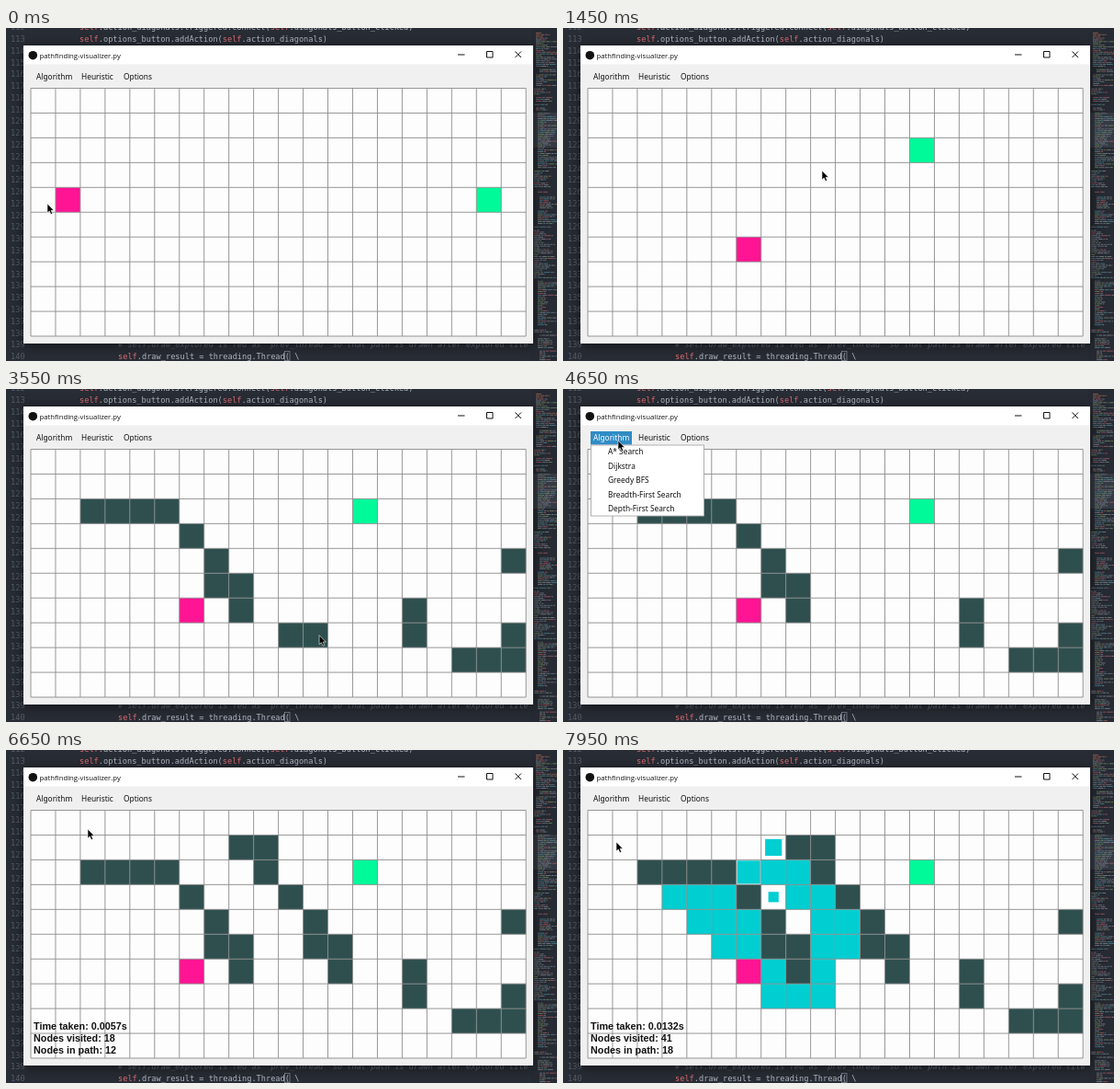
An HTML page that plays this animation: 600 px wide and 362 px high, repeating every 8000 ms.

```html
<!DOCTYPE html>
<html lang="en">
<head>
<meta charset="utf-8">
<title>Pathfinding visualizer</title>
<style>
html, body { margin: 0; width: 100%; height: 100%; overflow: hidden; background: #282c34; }
svg { display: block; width: 100vw; height: 100vh; }
text { white-space: pre; }
.code { font: 8.63px "DejaVu Sans Mono", monospace; fill: #b4bac6; }
.num { fill: #565c68; }
.self { fill: #e06c75; }
.note { fill: #5c6370; font-style: italic; }
.title { font: 7.75px "Open Sans", sans-serif; fill: #111; }
.menu { font: 8.35px "Noto Sans", sans-serif; fill: #111; }
.stats { font: bold 10.8px "Liberation Sans", Arial, sans-serif; fill: #111; }
.win { filter: drop-shadow(0 2px 7px rgba(0, 0, 0, .55)); }
</style>
</head>
<body>
<svg id="stage" viewBox="0 0 600 362"></svg>
<script>
const LOOP = 8000, COLS = 20, ROWS = 10;
const X0 = 27, Y0 = 65.5, CW = 26.96, CH = 26.95;
const STEP = 23, GROW = 89;
const PINK = '#ff1493', GREEN = '#00fa9a', WALL = '#2f4f4f', CYAN = '#00ced1', YELLOW = '#ffff00';

const stage = document.getElementById('stage');

function add(parent, tag, attrs, text) {
  const el = document.createElementNS('http://www.w3.org/2000/svg', tag);
  for (const k in attrs) el.setAttribute(k, attrs[k]);
  if (text !== undefined) el.textContent = text;
  parent.appendChild(el);
  return el;
}
const rect = (p, x, y, width, height, fill, more) =>
  add(p, 'rect', { x, y, width, height, fill, ...more });
const label = (p, x, y, cls, text) => add(p, 'text', { x, y, class: cls }, text);
const show = (el, on) => el.setAttribute('visibility', on ? 'visible' : 'hidden');

// "c,r c,r ..." to cell list
const cells = s => s.split(' ').map(p => p.split(',').map(Number));
const key = ([c, r]) => r * COLS + c;
const centre = ([c, r]) => [X0 + (c + .5) * CW, Y0 + (r + .5) * CH];

// Mouse strokes, evenly timed from start to end
const strokes = [
  { start: 1760, end: 2385, on: true, cells: cells('2,2 3,2 4,2 5,2 6,3 7,4 7,5 8,5 8,6 10,7 11,7 12,7 13,6 14,6 15,6 15,7 16,7 17,8 18,8 19,8 19,7 19,4') },
  { start: 2800, end: 3800, on: false, cells: cells('16,7 14,6 13,6 12,7 11,7 10,7') },
  { start: 5980, end: 6270, on: true, cells: cells('8,1 9,1 9,2 10,3 11,4 11,5 12,5 12,6') }
];
const path = cells('7,6 7,7 8,7 9,7 9,6 9,5 9,4 9,3 9,2 10,2 11,2 12,2');
const searches = [
  { start: 4767, end: 5980, visited: cells('6,5 6,4 5,4 5,3 5,5').concat(path), path,
    stats: ['0.0057s', 18, 12] },
  { start: 7385, end: LOOP, path: [], stats: ['0.0132s', 41, 18],
    visited: cells('6,5 6,4 5,4 5,3 4,3 7,6 5,5 4,4 3,3 7,7 8,7 9,7 9,6 9,5 9,4 10,4 10,5 9,3 8,3 8,2 7,2 6,2 7,1 7,3') }
];
const menus = [[4500, 4762], [6930, 7380]];

const wallEvents = [];
const track = [
  [0, 45, 191], [150, 66, 187], [260, 80, 190], [680, 202, 240], [850, 245, 216],
  [1030, 525, 186], [1080, 525, 186], [1320, 391, 133], [1450, 282, 155], [1690, 115, 134],
  [2400, 555, 175], [2520, 553, 178], [4000, 290, 262], [4440, 60, 56], [4650, 60, 56],
  [4730, 60, 64], [5000, 61, 61], [5700, 61, 61], [6330, 364, 241], [6650, 89, 86],
  [6860, 58, 55], [6970, 58, 56], [7270, 58, 97], [7500, 58, 100], [LOOP, 58, 100]
];
for (const s of strokes) {
  s.cells.forEach((cell, i) => {
    const t = s.start + (s.end - s.start) * i / (s.cells.length - 1);
    wallEvents.push({ t, id: key(cell), on: s.on });
    track.push([t, ...centre(cell)]);
  });
}
track.sort((a, b) => a[0] - b[0]);

function mouseAt(t) {
  let i = 1;
  while (i < track.length - 1 && track[i][0] < t) i++;
  const [t0, x0, y0] = track[i - 1], [t1, x1, y1] = track[i];
  const u = Math.min(1, Math.max(0, (t - t0) / (t1 - t0)));
  const e = t1 - t0 > 120 ? u * u * (3 - 2 * u) : u;
  return [x0 + (x1 - x0) * e, y0 + (y1 - y0) * e];
}
const cellUnder = ([x, y]) => [Math.floor((x - X0) / CW), Math.floor((y - Y0) / CH)];
function dragged(t, from, grab, drop) {
  return t < grab ? from : cellUnder(mouseAt(Math.min(t, drop)));
}

// Editor behind the window
function drawEditor() {
  rect(stage, 0, 0, 600, 362, '#282c34');
  const lineY = n => 15 + 12.78 * (n - 113);
  for (let n = 112; n <= 140; n++) label(stage, 5, lineY(n), 'code num', n);
  const code = (n, x, rich) => {
    const el = add(stage, 'text', { x, y: lineY(n), class: 'code' });
    rich.split(/(\bself\b)/).forEach(part =>
      add(el, 'tspan', part === 'self' ? { class: 'self' } : {}, part));
  };
  code(112, 80, 'self.action_diagonals.triggered.connect(self.diagonals_button_clicked)');
  code(113, 80, 'self.options_button.addAction(self.action_diagonals)');
  label(stage, 122, lineY(139), 'code note',
    "# self.draw_explored is fed as 'prev_thread' so that path is drawn after explored tile");
  code(140, 122, 'self.draw_result = threading.Thread( \\');
  rect(stage, 303.5, 351.5, 5.5, 10, 'none', { stroke: '#8b93a3', 'stroke-width': .7 });
}

function drawMinimap() {
  let seed = 11;
  const rnd = () => (seed = seed * 16807 % 2147483647) / 2147483647;
  rect(stage, 572, 0, 28, 362, '#262a32');
  rect(stage, 573, 92, 27, 38, '#343943');
  const tints = ['#8d939f', '#8d939f', '#777d89', '#b5606a', '#4f8f9b', '#7d9a68'];
  let indent = 0;
  for (let y = 3; y < 361; y += 1.9) {
    if (rnd() < .14) { indent = Math.floor(rnd() * 4) * 2; continue; }
    let x = 575 + indent;
    const end = Math.min(600, x + 5 + rnd() * 20);
    while (x < end) {
      const w = Math.min(1.5 + rnd() * 6, end - x);
      const tint = y < 10 ? '#b5705c' : tints[Math.floor(rnd() * tints.length)];
      rect(stage, x, y, w, .9, tint, { opacity: .75 });
      x += w + .8;
    }
  }
}

drawEditor();
drawMinimap();

// Window frame
const win = add(stage, 'g', { class: 'win' });
rect(win, 19, 19, 555, 324, '#f0f0f0');
rect(win, 19, 19, 555, 20.5, '#fff');
add(win, 'circle', { cx: 29.3, cy: 29.7, r: 4.8, fill: '#111' });
label(win, 36.5, 32.6, 'title', 'pathfinding-visualizer.py');
add(win, 'path', { d: 'M492 29h7.5M523.5 25.5h6.5v6.5h-6.5zM554.5 25.5l6.5 6.5m0-6.5l-6.5 6.5',
  fill: 'none', stroke: '#111', 'stroke-width': 1 });
const button = rect(win, 30, 46, 45, 14.5, '#308cc6');
const heading = label(win, 33, 56.3, 'menu', 'Algorithm');
label(win, 82, 56.3, 'menu', 'Heuristic');
label(win, 128, 56.3, 'menu', 'Options');

// Board
rect(stage, X0, Y0, COLS * CW, ROWS * CH, '#fefdfe');
const board = add(stage, 'g', {});
const tiles = [];
for (let r = 0; r < ROWS; r++) {
  for (let c = 0; c < COLS; c++) {
    tiles.push({
      x: X0 + c * CW, y: Y0 + r * CH,
      base: rect(board, X0 + c * CW, Y0 + r * CH, CW, CH, 'none'),
      top: rect(board, 0, 0, 0, 0, 'none')
    });
  }
}
let lines = '';
for (let c = 0; c <= COLS; c++) lines += `M${X0 + c * CW} ${Y0}v${ROWS * CH}`;
for (let r = 0; r <= ROWS; r++) lines += `M${X0} ${Y0 + r * CH}h${COLS * CW}`;
add(stage, 'path', { d: lines, fill: 'none', stroke: '#8c8c8c', 'stroke-width': .9 });

const stats = [304, 317, 330].map(y => label(stage, 30, y, 'stats', ''));

// Drop-down
const drop = add(stage, 'g', {});
rect(drop, 30.5, 61, 123, 77, '#fff', { stroke: '#a9a9a9', 'stroke-width': .9 });
const items = ['A* Search', 'Dijkstra', 'Greedy BFS', 'Breadth-First Search', 'Depth-First Search']
  .map((name, i) => ({
    top: 61.2 + 15.4 * i,
    bar: rect(drop, 31, 61.2 + 15.4 * i, 122, 15.2, '#308cc6'),
    text: label(drop, 49, 71.3 + 15.45 * i, 'menu', name)
  }));

const cursor = add(stage, 'path', {
  d: 'M0 0V10L2.3 8L3.9 11.6L5.7 10.8L4.1 7.3H7.2Z',
  fill: '#000', stroke: '#fff', 'stroke-width': .6
});

function paint(tile, base, top, scale) {
  tile.base.setAttribute('fill', base);
  tile.top.setAttribute('fill', scale > 0 ? top : 'none');
  if (scale <= 0) return;
  const w = CW * scale, h = CH * scale;
  tile.top.setAttribute('x', tile.x + (CW - w) / 2);
  tile.top.setAttribute('y', tile.y + (CH - h) / 2);
  tile.top.setAttribute('width', w);
  tile.top.setAttribute('height', h);
}

function render(t) {
  for (const tile of tiles) paint(tile, 'none', 'none', 0);
  for (const e of wallEvents) if (t >= e.t) paint(tiles[e.id], e.on ? WALL : 'none', 'none', 0);

  let result = null;
  for (const s of searches) {
    if (t < s.start) continue;
    result = s.stats;
    if (t >= s.end) continue;
    const grow = (list, from, under, colour) => list.forEach((cell, i) => {
      const k = Math.min(1, (t - from - i * STEP) / GROW);
      if (k > 0) paint(tiles[key(cell)], under, colour, k);
    });
    grow(s.visited, s.start, 'none', CYAN);
    grow(s.path, s.start + (s.visited.length - 1) * STEP + GROW, CYAN, YELLOW);
  }
  paint(tiles[key(dragged(t, [1, 4], 150, 680))], PINK, 'none', 0);
  paint(tiles[key(dragged(t, [18, 4], 1060, 1320))], GREEN, 'none', 0);

  ['Time taken: ', 'Nodes visited: ', 'Nodes in path: '].forEach((name, i) => {
    stats[i].textContent = result ? name + result[i] : '';
  });

  const [mx, my] = mouseAt(t);
  const open = menus.some(([a, b]) => t >= a && t < b);
  show(button, open);
  show(drop, open);
  heading.style.fill = open ? '#fff' : '';
  for (const it of items) {
    const hot = open && my >= it.top && my < it.top + 15.4;
    show(it.bar, hot);
    it.text.style.fill = hot ? '#fff' : '';
  }
  cursor.setAttribute('transform', `translate(${mx} ${my})`);
}

const begin = performance.now();
function tick() {
  render((performance.now() - begin) % LOOP);
  requestAnimationFrame(tick);
}
tick();
</script>
</body>
</html>
```
